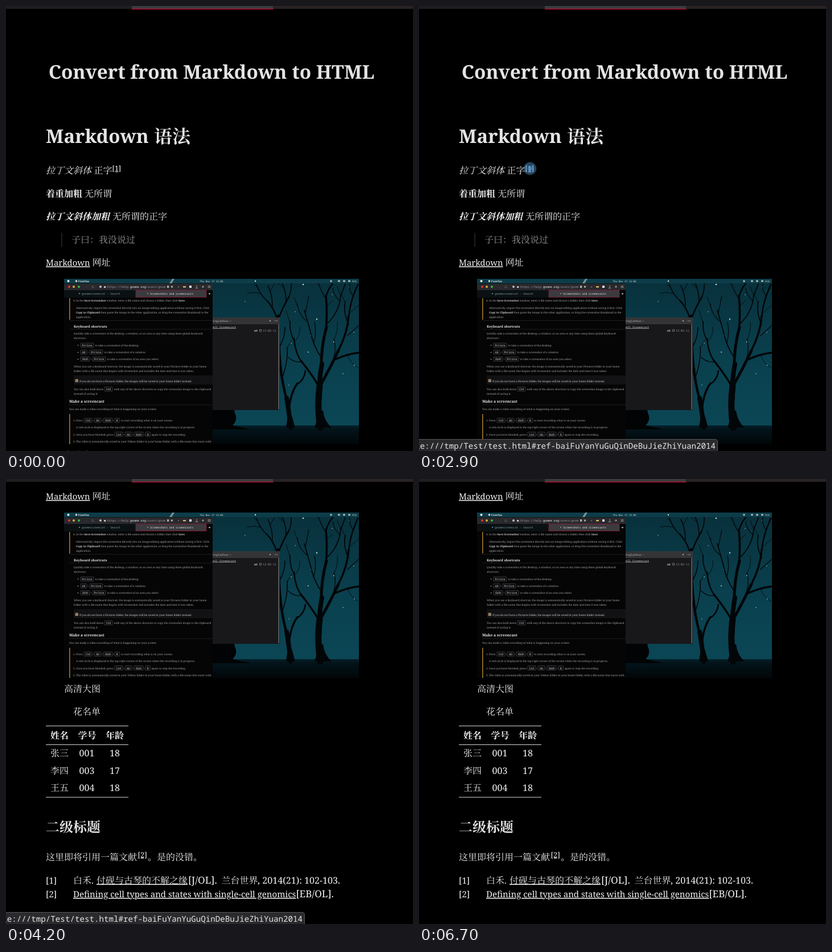
An HTML page that plays this animation: 715 px wide and 783 px high, repeating every 7700 ms.

```html
<!DOCTYPE html>
<html lang="en">
<head>
<meta charset="utf-8">
<title>Convert from Markdown to HTML</title>
<style>
  html, body { margin: 0; width: 100%; height: 100%; overflow: hidden; background: #000; }
  svg { display: block; width: 715px; height: 783px; }
  text {
    font-family: 'Noto Serif', 'Noto Serif CJK SC', 'Noto Sans CJK SC', 'Noto Sans CJK', serif;
    text-rendering: geometricPrecision; white-space: pre;
  }
  .b { font-weight: 700; }
  .i { font-style: italic; }
  .u { text-decoration: underline; }
  .m { font-family: 'Noto Sans Mono', 'DejaVu Sans Mono', monospace; }
  .c { text-anchor: middle; }
  .e { text-anchor: end; }
</style>
</head>
<body>
<svg id="stage" viewBox="0 0 715 783" xmlns="http://www.w3.org/2000/svg"></svg>
<script>
const LOOP = 7700, STEP = 100, SCROLL = 421;

const text = (x, y, s, size = 16, cls = '', fill = '#f4f4f4') =>
  `<text x="${x}" y="${y}" font-size="${size}" class="${cls}" fill="${fill}">${s}</text>`;
const rect = (x, y, w, h, fill, more = '') =>
  `<rect x="${x}" y="${y}" width="${w}" height="${h}" fill="${fill}" ${more}/>`;
const dot = (x, y, r, fill) => `<circle cx="${x}" cy="${y}" r="${r}" fill="${fill}"/>`;
const path = (d, w, stroke) =>
  `<path d="${d}" fill="none" stroke="${stroke}" stroke-width="${w}" stroke-linecap="round" stroke-linejoin="round"/>`;
const each = (list, f) => list.map(a => f(...a)).join('');

// Night scene behind the windows
const stars = [[522, 490, 1.3], [546, 551, 1.2], [536, 580, .9], [437, 487, .8], [531, 609, .9],
  [576, 591, 1], [586, 601, .8], [592, 647, .8], [612, 632, 1], [501, 593, .8], [497, 667, .7],
  [573, 508, .7], [603, 494, .7], [508, 538, .7], [420, 520, .7], [611, 574, .7]];

const limbs = [
  [11, 'M552 742 Q546 705 551 668'],
  [8, 'M551 690 Q549 660 555 630'],
  [5, 'M554 640 Q553 600 563 565'],
  [3.5, 'M562 570 Q565 540 562 510 M549 668 Q535 645 518 624'],
  [5, 'M552 668 Q570 636 584 606'],
  [3.5, 'M584 606 Q600 575 602 545 M578 622 Q600 612 620 610'],
  [2.5, 'M602 548 Q604 525 612 505 L618 490 M562 512 Q566 495 580 482 M518 624 Q508 610 506 585'],
  [1.8, 'M555 620 Q540 600 534 570 L524 535 M563 560 Q585 540 588 510 L598 484 M602 560 Q592 540 596 520 M506 588 Q498 575 499 555'],
  [1.2, 'M562 515 Q552 500 548 484 M530 556 Q514 544 512 524 M587 520 Q575 508 574 496 M610 510 Q602 502 604 488 M600 580 L620 562 M520 626 Q506 628 496 618 M540 594 Q546 578 542 556 M572 630 Q582 605 576 585 M526 540 L532 510'],
  [.8, 'M499 558 L492 536 M506 592 Q518 580 516 565 M588 510 L582 494 M596 522 L588 505 M576 588 Q584 572 582 556 M604 540 L620 526 M562 530 L574 518 M548 490 L540 480 M512 528 L506 512 M600 614 Q606 630 618 636'],
  [8, 'M500 742 Q497 712 493 690'],
  [4.5, 'M494 695 Q478 645 478 545'],
  [3.5, 'M497 710 Q500 680 512 664'],
  [2.5, 'M478 560 Q474 535 458 518 M478 552 Q486 530 497 512 M511 666 Q524 658 526 642'],
  [1.6, 'M459 519 Q446 508 440 490 M468 528 Q468 508 460 492 M492 520 Q492 500 484 486 M497 512 Q502 500 501 486 M485 655 Q496 625 494 600 M480 600 Q490 585 490 565'],
  [.9, 'M446 506 Q434 502 424 506 M464 502 L472 488 M487 496 L478 488 M494 602 L502 588 M440 494 L432 484']
];

const scene =
  rect(102, 480, 518, 291, 'url(#sky)') + each(stars, (x, y, r) => dot(x, y, r, '#b9dbe0')) +
  rect(363, 738, 257, 33, 'url(#ground)') +
  each(limbs, (w, d) => path(d, w, '#020608')) +
  '<path d="M542 742 Q547 728 547 712 H557 Q559 730 572 742Z M492 742 L495 720 H502 L508 742Z" fill="#020608"/>' +
  '<path d="M363 690 Q376 683 388 696 Q400 700 402 716 Q408 728 398 738 L430 745 H363Z" fill="#010304"/>';

// Desktop top bar
const topBar =
  rect(102, 480, 518, 8, '#0d3d49') + '<path d="M287 488 L292 480 H296 L291 488Z" fill="#7d8f94"/>' +
  dot(109.5, 484, 2, '#eee') + dot(123.5, 484, 1.8, '#ddd') +
  text(127, 486, 'Firefox', 4.5, 'm b', '#f2f2f2') + text(361, 486, 'Thu Nov 17 13:03', 4.3, 'm c', '#e4e4e4') +
  dot(438, 484, 1.2, '#ddd') + dot(571, 484, 1.8, '#a9b9bd') +
  each([[583], [592], [601]], x => rect(x, 482.5, 4, 3, '#a9b9bd', 'rx="1"')) +
  text(608, 486, '91%', 4.3, 'm', '#ddd');

const terminal =
  rect(363, 548, 118, 163, '#18181b') + rect(363, 548, 118, 12, '#343437') +
  text(363, 556, 'inglanhua:~', 5, 'm', '#b5b5b5') +
  dot(464, 554, 1.3, '#999') + path('M472 554 H477', .8, '#999') +
  text(363, 566.5, 'ell.Screencast', 4.9, 'm u', '#ddd') +
  text(436, 573, 'at', 4.9, 'm b', '#ddd') +
  '<circle cx="447" cy="571" r="1.9" fill="none" stroke="#aaa" stroke-width=".7"/>' +
  text(451, 573, '13:02:11', 5, 'm', '#9a9a9a') + rect(478.5, 560, 1.5, 150, '#6c6c70');

// Browser window with the help page
const GREY = '#a8a8a8';
const line = (x, y, s) => text(x, y, s, 4.65, '', GREY);
const key = (x, y, w, s) =>
  rect(x, y - 5.8, w, 7.6, '#0b0b0c', 'rx="1" stroke="#5a5a5e" stroke-width=".6"') +
  text(x + w / 2, y, s, 4.8, 'c', '#ddd');
const plus = (x, y) => text(x, y, '+', 4.5, 'c', GREY);
const combo = (x, y) =>
  key(x, y, 14, 'Ctrl') + plus(x + 16, y) + key(x + 18, y, 12, 'Alt') + plus(x + 32, y) +
  key(x + 34, y, 16, 'Shift') + plus(x + 52, y) + key(x + 54, y, 8.5, 'R');
const strong = s => `<tspan class="b" fill="#d2d2d2">${s}</tspan>`;

const browser =
  rect(102, 488, 261, 283, '#050506') + rect(102, 488.5, 261, 11.5, '#29292d') +
  each([[111, '#d8383a'], [119, '#dfae2d'], [128, '#36b34a']], (x, c) => dot(x, 494, 2, c)) +
  text(140, 496, '‹', 5, 'm', '#666') + path('M153 492.3 a1.8 1.8 0 1 0 1.5 2', .7, '#777') +
  dot(166, 494, 2, '#bbb') + rect(172, 493, 3.4, 3, '#bbb') +
  text(178, 496, 'https://help.<tspan fill="#fff">gnome.org</tspan>/users/gnom', 5.15, 'm', '#9c9ca0') +
  rect(283, 492, 3.2, 4, '#aaa') + dot(291.5, 494, 1.8, '#aaa') + text(303, 496, '+', 5, 'm c', '#ddd') +
  rect(311, 493, 5, 2.4, '#d8b565') + rect(322, 492, 4, 4, '#ddd') + path('M335 491.8 V495 M333 496.3 H337', .8, '#bbb') +
  dot(346, 494, 1.8, '#888') + path('M355 492.5 H359 M355 494 H359 M355 495.5 H359', .6, '#bbb') +
  rect(102, 500, 126, 13, '#0b1113') + rect(228, 500, 124, 12.6, '#3b3b3f', 'stroke="#8f1630" stroke-width=".8"') +
  dot(129, 506, 1.2, '#4a8088') + text(133, 508, 'gnomescreencat - Search', 4.9, 'm', '#7f9da2') +
  dot(249, 506, .9, '#aaa') + text(253, 508, 'Screenshots and screencasts', 4.7, 'm', '#f0f0f0') +
  '<path d="M355.5 505.5 h4 l-2 2.4Z" fill="#ccc"/>' +
  rect(111, 514, 1.6, 38, '#a07c22') + rect(111, 718, 1.6, 53, '#a07c22') +
  line(118, 520, `4. In the ${strong('Save Screenshot')} window, enter a file name and choose a folder, then click ${strong('Save')}.`) +
  line(123, 532.5, 'Alternatively, import the screenshot directly into an image-editing application without saving it first. Click') +
  line(123, 540.5, `${strong('Copy to Clipboard')} then paste the image in the other application, or drag the screenshot thumbnail to the`) +
  line(123, 548.5, 'application.') +
  text(119, 565.5, 'Keyboard shortcuts', 5.9, 'b', '#e6e6e6') +
  line(119, 578, 'Quickly take a screenshot of the desktop, a window, or an area at any time using these global keyboard') +
  line(119, 586, 'shortcuts:') +
  each([[597], [609.5], [621.5]], y => dot(126.5, y, .8, '#ccc')) +
  key(131, 599, 23, 'Prt Scrn') + line(156.5, 599, 'to take a screenshot of the desktop.') +
  key(131, 611, 11, 'Alt') + plus(144.5, 611) + key(147, 611, 23, 'Prt Scrn') + line(172.5, 611, 'to take a screenshot of a window.') +
  key(131, 623.2, 16, 'Shift') + plus(149.5, 623.2) + key(152, 623.2, 23, 'Prt Scrn') + line(177.5, 623.2, 'to take a screenshot of an area you select.') +
  line(119, 636, 'When you use a keyboard shortcut, the image is automatically saved in your Pictures folder in your home') +
  line(119, 644, 'folder with a file name that begins with Screenshot and includes the date and time it was taken.') +
  rect(119, 650, 244, 16, '#121214') + rect(121.5, 656.5, 5.5, 5.5, '#8d7c68', 'rx="1"') +
  text(129, 661.5, 'If you do not have a Pictures folder, the images will be saved in your home folder instead.', 4.65, '', '#cfcfcf') +
  line(119, 676, 'You can also hold down') + key(173, 676, 14, 'Ctrl') +
  line(189.5, 676, 'with any of the above shortcuts to copy the screenshot image to the clipboard') +
  line(119, 684, 'instead of saving it.') +
  text(111, 698, 'Make a screencast', 6.7, 'b', '#e6e6e6') +
  each([[553], [568.5], [701.5]], y => rect(111, y, 252, .7, '#29292b')) +
  line(111, 711, 'You can make a video recording of what is happening on your screen:') +
  line(118, 731, '1. Press') + combo(137, 731) + line(202, 731, 'to start recording what is on your screen.') +
  line(123, 743, 'A red circle is displayed in the top right corner of the screen when the recording is in progress.') +
  line(118, 755.5, '2. Once you have finished, press') + combo(191, 755.5) + line(255.5, 755.5, 'again to stop the recording.') +
  line(118, 767.5, '3. The video is automatically saved in your Videos folder in your home folder, with a file name that starts with');

// Document
const rows = [['张三', '001', 18], ['李四', '003', 17], ['王五', '004', 18]];
const page =
  text(361, 128, 'Convert from Markdown to HTML', 33.3, 'b c', '#e4e4e4') +
  text(70, 241, 'Markdown', 33, 'b', '#e4e4e4') + text(260, 241, '语法', 32, 'b', '#e4e4e4') +
  text(70, 295, '拉丁文斜体', 16, 'i') + text(154.5, 295, '正字') + text(186.5, 290, '[1]', 12.3, 'u') +
  text(70, 336, '着重加粗', 16, 'b') + text(138, 336, '无所谓') +
  text(70, 376, '拉丁文斜体加粗', 16, 'b i') + text(187, 376, '无所谓的正字') +
  rect(97, 399, 2, 25, '#1e1e1e') + text(115, 417, '子曰：我没说过', 16, '', '#9a9a9a') +
  text(70, 457, 'Markdown', 14.8, 'u') + text(151.5, 457, '网址') +
  `<g clip-path="url(#shot)">${scene}${topBar}${terminal}<g clip-path="url(#win)">${browser}</g></g>` +
  `<g transform="translate(0 ${SCROLL})">` +
  text(102, 375, '高清大图') + text(118, 415, '花名单') +
  each([[434], [467], [559.5]], y => rect(70, y, 145, 1, '#d8d8d8')) +
  each([[78, '姓名'], [126.5, '学号'], [175, '年龄']], (x, s) => text(x, 457, s, 16, 'b')) +
  rows.map(([name, id, age], i) => {
    const y = 488 + i * 30.5;
    return text(78, y, name) + text(142, y, id, 16, 'c') + text(191, y, age, 16, 'c');
  }).join('') +
  text(70, 621, '二级标题', 24, 'b', '#e4e4e4') +
  text(70, 671, '这里即将引用一篇文献') + text(231.5, 665.5, '[2]', 12.8, 'u') + text(249, 671, '。是的没错。') +
  text(70, 711.5, '[1]', 15) + text(118, 711.5, '白禾') + text(150, 711.5, '.', 15) +
  text(159, 711.5, '付砚与古琴的不解之缘', 16, 'u') + text(320, 711.5, '[J/OL].', 17) +
  text(378.5, 711.5, '兰台世界') + text(442, 711.5, ', 2014(21): 102-103.', 16.1) +
  text(70, 736, '[2]', 15) +
  text(118, 736, 'Defining cell types and states with single-cell genomics', 15.05, 'u') +
  text(509.5, 736, '[EB/OL].', 17) + '</g>';

const chrome =
  rect(0, 0, 221, 5, '#1f1f21') + rect(469, 0, 246, 5, '#292324') +
  rect(221, 0, 248, 5, '#3c3c3f') + rect(221, 4.6, 248.5, 1.6, '#a80f30');

const status =
  '<path d="M-2 762.5 H520 Q524.5 762.5 524.5 767 V785 H-2Z" fill="#2a2a2d" stroke="#57575b"/>' +
  text(521, 779, 'file:///tmp/Test/test.html#ref-baiFuYanYuGuQinDeBuJieZhiYuan2014', 14.2, 'm e', '#e6e6e6');

const stops = (id, ...list) =>
  `<linearGradient id="${id}" x2="0" y2="1">${each(list, (o, c) => `<stop offset="${o}" stop-color="${c}"/>`)}</linearGradient>`;

const stage = document.getElementById('stage');
stage.innerHTML =
  `<defs>${stops('sky', [0, '#08303b'], [.5, '#0a404e'], [.88, '#0b4655'], [1, '#08303b'])}` +
  `${stops('ground', [0, '#05202a'], [.2, '#03141a'], [1, '#010608'])}` +
  `<clipPath id="shot">${rect(102, 480, 518, 291, '#000')}</clipPath>` +
  `<clipPath id="win">${rect(102, 488, 261, 283, '#000')}</clipPath></defs>` +
  rect(0, 0, 715, 783, '#000') + `<g id="page">${page}</g><g id="ripples"></g>` +
  chrome + `<g id="status">${status}</g>`;

// Pointer ripples: delay, duration, start scale, end scale, start opacity
const PING = 2700, RADIUS = 19.5;
const ripples = [[0, 830, .25, 1.5, .5], [50, 1000, 0, 1.25, .7], [350, 1000, 0, 1, .3]];

const $ = id => document.getElementById(id);
const pageEl = $('page'), rippleEl = $('ripples'), statusEl = $('status');
rippleEl.innerHTML = ripples.map(() =>
  '<circle cx="195" cy="286" fill="#5298d2" stroke="#5298d2" stroke-opacity=".4" stroke-width="2"/>').join('');

function statusOpacity(t) {
  if (t < 1500 || t >= 4400) return 0;
  return Math.min(1, .4 + (t - 1500) / 100 * .35);
}

function draw() {
  const t = Math.floor(performance.now() % LOOP / STEP) * STEP;
  pageEl.setAttribute('transform', `translate(0 ${t < 4200 ? 0 : -SCROLL})`);
  statusEl.setAttribute('opacity', statusOpacity(t));
  ripples.forEach(([delay, dur, from, to, alpha], i) => {
    const p = (t - PING - delay) / dur, on = p > 0 && p < 1 && t < 4200;
    const c = rippleEl.children[i];
    c.setAttribute('r', on ? RADIUS * (from + (to - from) * p) : 0);
    c.setAttribute('opacity', on ? alpha * (1 - p * p) : 0);
  });
  requestAnimationFrame(draw);
}
draw();
</script>
</body>
</html>
```
